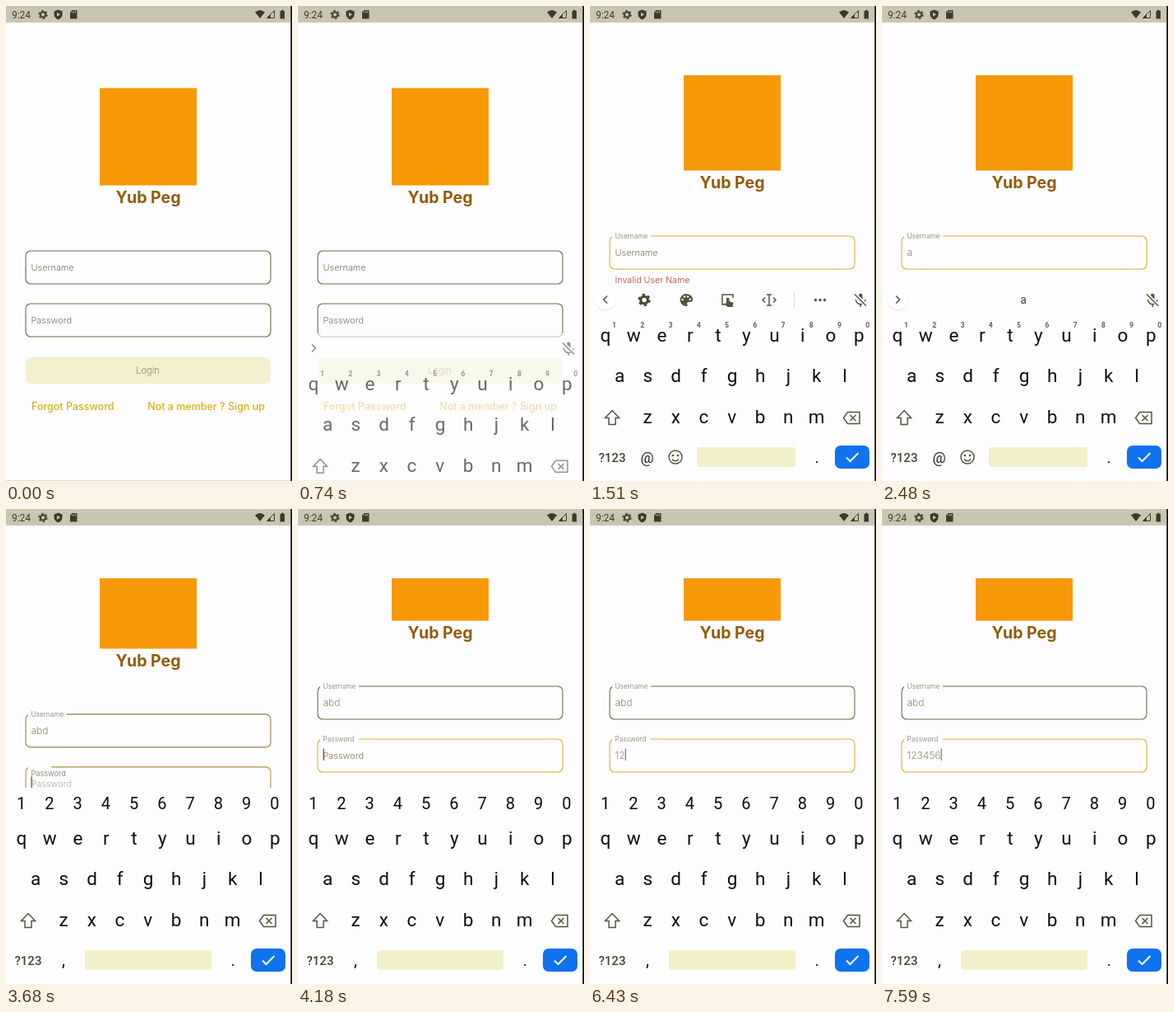
An HTML page for the animation above (8000 ms loop, 348 by 576 pixels).

```html
<!DOCTYPE html>
<html lang="en">
<head>
<meta charset="utf-8">
<title>Login form</title>
<style>
html, body { margin: 0; width: 100%; height: 100%; overflow: hidden; background: #fdfdff; }
svg { display: block; width: 100vw; height: 100vh; }
text { font-family: Inter, "Open Sans", sans-serif; }
.mid { text-anchor: middle; }
.key, .key text { font-family: Roboto, Arial, sans-serif; text-anchor: middle; }
.line { fill: none; stroke: #55553f; stroke-width: 1.5; }
.link { font-size: 12.5px; font-weight: 450; fill: #dcae1c; }
</style>
</head>
<body>
<svg viewBox="0 0 348 576" preserveAspectRatio="none">
  <defs>
    <clipPath id="view"><rect y="84" width="346" height="492"/></clipPath>
    <g id="gear">
      <circle r="3.200" fill="none" stroke="#4a4936" stroke-width="2.300"/>
      <circle r="4.800" fill="none" stroke="#4a4936" stroke-width="1.700" stroke-dasharray="2.500 2.527"/>
    </g>
  </defs>
  <rect width="348" height="576" fill="#fdfdff"/>
  <rect y="575" width="346" height="1" fill="#dcdbd0"/>
  <g clip-path="url(#view)">
    <g id="page">
      <rect x="114" y="99.5" width="118" height="118" fill="#f79806"/>
      <text class="mid" x="173" y="239" font-size="19.5" font-weight="700" fill="#925c04">Yub Peg</text>
      <g id="fields"></g>
      <rect x="24" y="426" width="298" height="32" rx="7" fill="#f2f0cf"/>
      <text class="mid" x="172.5" y="446" font-size="11" font-weight="300" fill="#8f8a62">Login</text>
      <text class="link" x="31" y="490">Forgot Password</text>
      <text class="link" x="315" y="490" text-anchor="end">Not a member ? Sign up</text>
    </g>
  </g>
  <g id="keyboard">
    <rect y="338" width="346" height="240" fill="#fdfdff"/>
    <g id="letters" class="key" font-size="22.5" fill="#0e0e0c"></g>
    <g id="textMode">
      <g id="supers" class="key" font-size="8.8" font-weight="700" fill="#67654f"></g>
      <circle id="knobShade" cx="19" cy="357" r="12.5" fill="#e4e2d4"/>
      <circle id="knob" cx="19" cy="356" r="12.5" fill="#fff"/>
      <path id="chevron" class="line" d="M-2 -4.5L2.5 0L-2 4.5"/>
      <g id="tools">
        <use href="#gear" transform="translate(66 356.5) scale(1.35)"/>
        <path d="M117 349a7.5 7.5 0 1 0 0 15c2 0 2-1.500 1.400-2.500c-.8-1.500 0-2.500 1.600-2.500h2c2.500 0 3-2 3-3c0-4-3.500-7-8-7z" fill="#55553f"/>
        <g fill="#fdfdff"><circle cx="112.500" cy="356" r="1.200"/><circle cx="115" cy="352.500" r="1.200"/><circle cx="119" cy="352.500" r="1.200"/><circle cx="121.700" cy="355.800" r="1.200"/></g>
        <path class="line" d="M165 362H161V350H174V354"/>
        <path d="M166 354v7l-1.500-1l-1 1l4 4h6l1-5l-5-2v-4z" fill="#55553f"/>
        <path class="line" d="M215 350h6M215 363h6M218 350v13M213 353.500l-3 3l3 3M223 353.500l3 3l-3 3"/>
        <path d="M248.500 347V366" stroke="#e4e0bd"/>
        <g fill="#55553f"><circle cx="274.500" cy="356.500" r="1.700"/><circle cx="280" cy="356.500" r="1.700"/><circle cx="285.500" cy="356.500" r="1.700"/></g>
      </g>
      <text id="suggest" class="key" x="172" y="361" font-size="14" fill="#4a4930"></text>
      <path d="M327 351a2.300 2.300 0 0 1 4.600 0v5a2.300 2.300 0 0 1-4.600 0z" fill="#55553f"/>
      <path class="line" d="M323.500 356a5.700 5.700 0 0 0 11.400 0M329.200 361.500v3.500"/>
      <path d="M322.500 349.500L336 363" stroke="#fdfdff" stroke-width="4"/>
      <path class="line" d="M322 349.500L336 363.500"/>
      <text class="key" x="69.500" y="554" font-size="18" fill="#26261c">@</text>
      <circle class="line" cx="104" cy="547" r="8"/>
      <circle cx="101" cy="545" r="1.300" fill="#55553f"/><circle cx="107" cy="545" r="1.300" fill="#55553f"/>
      <path class="line" d="M100 549.500q4 4.500 8 0"/>
    </g>
    <g id="numMode">
      <g id="digits" class="key" font-size="20" fill="#0e0e0c"></g>
      <text class="key" x="70" y="554" font-size="20">,</text>
    </g>
    <path class="line" d="M27 490.500L35.500 499.500H31V507.500H23V499.500H18.500Z"/>
    <path class="line" d="M313.500 492.500H328V506.500H313.500L308.500 499.500ZM316.500 496l7 7M323.500 496l-7 7"/>
    <text class="key" x="27" y="553" font-size="15" font-weight="500" fill="#45442e">?123</text>
    <rect id="space" y="535" height="24" rx="3" fill="#f2f0c8"/>
    <text class="key" x="276" y="554" font-size="18">.</text>
    <rect x="298" y="533" width="42" height="28" rx="7" fill="#0f72ee"/>
    <path d="M312 547.500L316.500 552L326.500 542" fill="none" stroke="#fff" stroke-width="2"/>
  </g>
  <rect width="346" height="20" fill="#c9c6b0"/>
  <g fill="#3d3a2a">
    <text class="key" x="18.500" y="15" font-size="12">9:24</text>
    <use href="#gear" transform="translate(45 10.500)"/>
    <path d="M63.500 4.500L68.500 6.500V10.500Q68 14.500 63.500 16.500Q59 14.500 58.500 10.500V6.500Z"/>
    <path d="M62 7.800V12.800L66 10.300Z" fill="#c9c6b0"/>
    <path d="M80.500 5H86.500V15.500H78V7.500Z"/>
    <path d="M80.500 6.500v2M82.500 6v2.500M84.500 6v2.500" stroke="#c9c6b0" stroke-width=".8"/>
    <path d="M303 7.500Q309 2.500 315 7.500L309 15Z"/>
    <path d="M326.500 5.500V14.500H317.500Z" fill="none" stroke="#3d3a2a"/>
    <path d="M322 10V14.500H317.500Z"/>
    <path d="M333.500 6H335V4.800H337.500V6H339V15.500H333.500Z"/>
  </g>
  <rect x="346.300" width="1.700" height="576" fill="#080808"/>
</svg>
<script>
const NS = "http://www.w3.org/2000/svg", LOOP = 8000;
const IDLE = [108, 106, 72], FOCUS = [218, 176, 48];
const $ = id => document.getElementById(id);
const clamp = v => Math.max(0, Math.min(1, v));
const ramp = (t, start, length) => clamp((t - start) / length);
const smooth = p => p * p * (3 - 2 * p);
const mix = (a, b, p) => a + (b - a) * p;
const tint = p => `rgb(${IDLE.map((c, i) => Math.round(mix(c, FOCUS[i], p)))})`;

function set(node, attrs) {
  for (const name in attrs) node.setAttribute(name, attrs[name]);
}
function add(parent, tag, attrs, text = "") {
  const node = document.createElementNS(NS, tag);
  set(node, attrs);
  node.textContent = text;
  return parent.appendChild(node);
}
const fade = (node, opacity) => set(node, { opacity: +opacity });

function keyRow(group, chars, x, y) {
  [...chars].forEach((c, i) => add(group, "text", { x: x + i * 34.25, y }, c));
}
keyRow($("letters"), "qwertyuiop", 19, 407);
keyRow($("letters"), "asdfghjkl", 36, 456);
keyRow($("letters"), "zxcvbnm", 70, 506);
keyRow($("supers"), "1234567890", 29.5, 390);
keyRow($("digits"), "1234567890", 18.5, 364);

function makeField(y, name, message) {
  const g = add($("fields"), "g", { transform: `translate(0 ${y})` });
  const text = (attrs, value) => add(g, "text", { x: 30.5, "font-weight": 300, ...attrs }, value);
  return {
    box: add(g, "rect", { x: 24, width: 298, height: 40, rx: 6, fill: "none", "stroke-width": 1.1 }),
    gap: add(g, "rect", { x: 27, y: -2, height: 4, fill: "#fdfdff" }),
    label: text({ fill: "#7d745f" }, name),
    hint: text({ y: 24, "font-size": 10.9, fill: "#827853" }, name),
    value: text({ y: 24, "font-size": 12, fill: "#938a66" }),
    error: text({ y: 57, "font-size": 10.7, fill: "#b6432f" }, message),
    caret: add(g, "rect", { y: 11.5, width: 1.3, height: 14.5 })
  };
}
const user = makeField(297, "Username", "Invalid User Name");
const pass = makeField(361, "Password", "password is wrong");

function drawField(f, { lift, focus, value, error, caret, caretColor }) {
  set(f.box, { stroke: tint(focus) });
  set(f.gap, { width: 47 * lift });
  set(f.label, { y: mix(24, 3, lift), "font-size": mix(10.9, 8.3, lift) });
  f.value.textContent = value;
  fade(f.hint, value ? 0 : lift);
  fade(f.error, error);
  fade(f.caret, caret);
  const end = value ? f.value.getComputedTextLength() : 0;
  set(f.caret, { x: 30.5 + end, fill: caretColor });
}

// Part of the word typed so far, given the time of each key press
const typed = (word, times, t) => word.slice(0, times.filter(at => t >= at).length);

function render(t) {
  const scroll = 18 * smooth(ramp(t, 880, 170)) + 64 * smooth(ramp(t, 3585, 200));
  set($("page"), { transform: `translate(0 ${-scroll})` });

  const name = typed("abd", [2310, 2700, 3060], t);
  const code = typed("123456", [5900, 6430, 6700, 7120, 7360, 7590], t);
  drawField(user, {
    lift: smooth(ramp(t, 850, 180)),
    focus: ramp(t, 850, 180) - ramp(t, 3560, 180),
    value: name,
    error: name ? 0 : ramp(t, 1300, 170),
    caret: false, caretColor: "#b6432f"
  });
  drawField(pass, {
    lift: smooth(ramp(t, 3570, 195)),
    focus: ramp(t, 3570, 195),
    value: code,
    error: !code && t >= 5650,
    caret: t >= 3570 && !(t >= 4650 && t < 5110) && !(t >= 6270 && t < 6430),
    caretColor: code ? "#3a9cc0" : "#a63d2c"
  });

  const rise = ramp(t, 690, 190);
  set($("keyboard"), {
    transform: `translate(0 ${110 * (1 - rise) ** 2})`,
    opacity: ramp(t, 690, 83)
  });
  const numeric = t >= 3540;
  fade($("textMode"), !numeric);
  fade($("numMode"), numeric);
  set($("space"), numeric ? { x: 96, width: 154 } : { x: 130, width: 120 });

  const open = name ? 0 : ramp(t, 1120, 160);
  const knob = t >= 1120;
  fade($("knob"), knob);
  fade($("knobShade"), knob);
  set($("chevron"), { transform: `translate(19 356) scale(${open > .5 ? -1 : 1} 1)` });
  fade($("tools"), open);
  $("suggest").textContent = name;
}

const start = performance.now();
function tick() {
  render((performance.now() - start) % LOOP);
  requestAnimationFrame(tick);
}
render(0);
requestAnimationFrame(tick);
</script>
</body>
</html>
```
